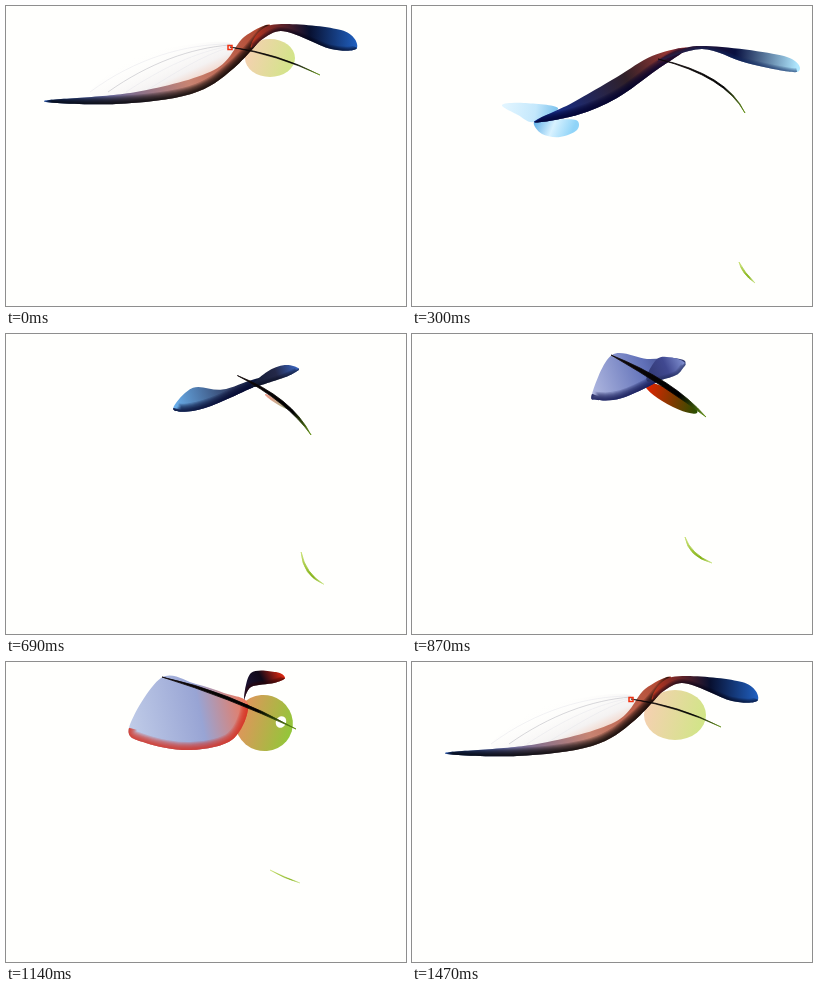
Animation, 400 px wide and 300 px high, one loop 1.5 s. Source, as an HTML page with a canvas:

```html
<!DOCTYPE html>
<html>
<head>
<meta charset="utf-8">
<style>
  html, body { margin: 0; overflow: hidden; background: #fffffd; }
  canvas { display: block; }
</style>
</head>
<body>
<canvas id="stage" width="400" height="300"></canvas>
<script>
const ctx = document.getElementById('stage').getContext('2d');
const LOOP = 1500, STEP = 30;
const TIMES = [0, 300, 540, 870, 1140, 1350, 1470];

// One row per key time; a missing last row repeats the first.
const leftWing = [
  [38,95, 110,98, 185,88, 228,62, 264,20, 238,31, 208,64, 130,86],
  [122,116, 165,109, 205,92, 243,65, 275,42, 240,50, 205,71, 160,97],
  [147,90, 172,91, 200,82, 230,69, 262,53, 232,62, 197,79, 170,82],
  [180,60, 186,66, 210,64, 245,48, 273,30, 262,24, 235,25, 200,21],
  [123,66, 140,81, 185,88, 227,77, 242,42, 218,31, 190,22, 155,16],
  [42,68, 105,87, 175,91, 222,73, 250,22, 222,26, 190,34, 120,61]
];
const rightWing = [
  [245,42, 275,25, 325,43, 351,42, 335,24, 265,19],
  [245,56, 290,43, 335,57, 385,66, 372,50, 285,40],
  [252,57, 280,46, 303,45, 319,41, 303,37, 275,46],
  [235,47, 262,42, 271,34, 273,29, 262,24, 245,25],
  [238,38, 245,25, 268,21, 279,16, 270,10, 245,11],
  [222,22, 262,17, 290,24, 306,23, 295,11, 255,14]
];
// Start, control point, end, thickness
const tail = [
  [224,41, 272,47, 314,69, 2], [246,53, 315,68, 333,107, 3],
  [252,57, 302,74, 316,113, 3], [199,21, 262,46, 294,83, 10],
  [156,15, 222,29, 290,67, 6], [226,36, 245,42, 252,46, 2]
];
const reflection = [
  [330,258, 334,268, 342,275, 0], [327,256, 332,266, 343,277, 3],
  [314,234, 318,256, 333,268, 3], [273,203, 279,220, 300,229, 4],
  [264,208, 278,215, 294,221, 1.5], [262,210, 276,215, 290,219, 0]
];
// Centre, radii, rotation
const belly = [
  [264,52, 25,19, 0], [285,70, 0,0, .5], [280,70, 0,0, .6],
  [259,64, 30,7, .5], [258,61, 29,28, .3], [262,61, 40,30, .1], [263,53, 31,25, 0]
];
const bellyHole = [
  [276,58, 0,0, .5], [276,58, 0,0, .5], [276,58, 0,0, .5],
  [275,60, 0,0, .5], [275,60, 5,6, .5], [280,57, 22,17, .5]
];
const wingHole = [
  [211,42, 0,0, -.5], [211,42, 0,0, -.5], [211,42, 0,0, -.5],
  [215,38, 0,0, -.5], [215,38, 0,0, -.5], [211,42, 22,10, -.45]
];
const drift = [[0,0], [0,0], [0,0], [0,0], [0,0], [0,0], [-5,-4]];
const fades = { // [membrane, light tips, belly]
  rows: [[1,0,.8], [0,1,0], [0,0,0], [0,0,1], [0,0,1], [0,0,1], [1,0,.8]]
};

const rgbRows = rows => rows.map(row => row.split(' ').flatMap(hex =>
  [0, 2, 4].map(i => parseInt(hex.slice(i, i + 2), 16))));
// Tip, middle, root, lower edge
const leftColors = rgbRows([
  '1a50b8 c88472 b04028 000000', '1030a0 302028 c04038 000030',
  '30a0f0 101018 101010 000010', 'b0b8e0 6070b8 303870 101850',
  'c0cce8 98a4d4 f07858 d03020', '3070c0 4a68b8 d04020 081040'
]);
// Root, middle, tip, lower edge
const rightColors = rgbRows([
  'c03820 081030 2060c0 000018', '501018 081040 b0e8ff 102860',
  '000000 080808 2050b0 000000', '303870 404890 8090d0 202858',
  '201840 100818 e02810 300000', 'e05030 300810 1a3a90 000010'
]);
const bellyColors = rgbRows([
  'f4c4a0 c4e068', 'f4a080 a0c040', 'f04020 508010',
  'f02000 205000', 'e89060 90c838', 'f07040 a0d030'
]);

// Smooth periodic interpolation of a keyed row at time t.
function at(rows, t) {
  const n = TIMES.length;
  const time = k => TIMES[(k + n) % n] + LOOP * Math.floor(k / n);
  const row = k => rows[(k + n) % n] || rows[0];
  let i = n - 1;
  while (TIMES[i] > t) i--;
  const span = time(i + 1) - time(i), s = (t - time(i)) / span;
  return row(i).map((a, j) => {
    const b = row(i + 1)[j];
    const slope = k => (row(k + 1)[j] - row(k - 1)[j]) / (time(k + 1) - time(k - 1)) * span;
    const r = 1 - s;
    return a * (1 + 2 * s) * r * r + slope(i) * s * r * r
         + b * s * s * (3 - 2 * s) - slope(i + 1) * s * s * r;
  });
}

const clamp = v => Math.max(0, Math.min(1, v));

function colorsAt(rows, t) {
  const v = at(rows, t), out = [];
  for (let i = 0; i < v.length; i += 3) {
    out.push(`rgb(${v.slice(i, i + 3).map(c => Math.round(255 * clamp(c / 255)))})`);
  }
  return out;
}

function gradient(x0, y0, x1, y1, colors, middle = .6) {
  const g = ctx.createLinearGradient(x0, y0, x1, y1);
  colors.forEach((c, i) => g.addColorStop(
    i === 0 ? 0 : i === colors.length - 1 ? 1 : middle, c));
  return g;
}

// Closed curve through the points, or only its first few segments.
function spline(v, segments = v.length / 2) {
  const path = new Path2D(), n = v.length / 2;
  const point = i => { const k = (i + n) % n; return [v[2 * k], v[2 * k + 1]]; };
  path.moveTo(...point(0));
  for (let i = 0; i < segments; i++) {
    const [a, b, c, d] = [-1, 0, 1, 2].map(k => point(i + k));
    path.bezierCurveTo(
      b[0] + (c[0] - a[0]) / 6, b[1] + (c[1] - a[1]) / 6,
      c[0] - (d[0] - b[0]) / 6, c[1] - (d[1] - b[1]) / 6, c[0], c[1]);
  }
  return path;
}

function drawWing(rows, colorRows, far, middle, edgeWidth, t) {
  const v = at(rows, t), colors = colorsAt(colorRows, t), edge = colors.pop();
  const outline = spline(v);
  ctx.save();
  ctx.fillStyle = gradient(v[0], v[1], v[2 * far], v[2 * far + 1], colors, middle);
  ctx.fill(outline);
  ctx.clip(outline);
  ctx.strokeStyle = edge;
  ctx.globalAlpha = .2;
  const lower = spline(v, far);
  for (let w = 2; w <= edgeWidth; w += 2) {
    ctx.lineWidth = w;
    ctx.stroke(lower);
  }
  ctx.restore();
}

function drawBlade(rows, colors, t) {
  const [x0, y0, cx, cy, x1, y1, width] = at(rows, t);
  if (width < .1) return;
  const d = Math.hypot(x1 - x0, y1 - y0);
  const nx = (y0 - y1) / d * width, ny = (x1 - x0) / d * width;
  ctx.beginPath();
  ctx.moveTo(x0, y0);
  ctx.quadraticCurveTo(cx, cy, x1, y1);
  ctx.quadraticCurveTo(cx + nx, cy + ny, x0, y0);
  ctx.fillStyle = ctx.strokeStyle = gradient(x0, y0, x1, y1, colors, .7);
  ctx.lineWidth = Math.min(.8, width / 3);
  ctx.fill();
  ctx.stroke();
}

function drawEllipse([x, y, rx, ry, angle], fill) {
  if (rx < .3 || ry < .3) return;
  ctx.beginPath();
  ctx.ellipse(x, y, rx, ry, angle, 0, 7);
  ctx.fillStyle = fill;
  ctx.fill();
}

function drawMembrane(alpha) {
  ctx.globalAlpha = alpha;
  const veil = spline([84,88, 128,52, 180,39, 224,37, 224,56, 190,78, 140,88]);
  ctx.fillStyle = gradient(150, 40, 175, 95, ['#fffffd00', '#f4f2f2', '#f0b8a0'], .6);
  ctx.fill(veil);
  ctx.lineWidth = .5;
  for (let i = 0; i < 4; i++) {
    ctx.strokeStyle = i === 1 ? '#b0b0b8' : '#e4e4ea';
    ctx.beginPath();
    ctx.moveTo(224, 38 + i);
    ctx.bezierCurveTo(180 + i * 5, 38 + i * 4, 130 + i * 13, 52 + i * 5, 84 + i * 18, 86);
    ctx.stroke();
  }
  ctx.globalAlpha = 1;
}

function drawLightTips(alpha) {
  ctx.globalAlpha = alpha;
  ctx.fillStyle = gradient(90, 98, 146, 108, ['#e4f6ff', '#c4e8fc', '#78c0ec']);
  ctx.fill(spline([90,99, 112,97, 146,102, 122,116, 106,109]));
  ctx.fillStyle = gradient(122, 116, 158, 131, ['#60b0e8', '#d8f2ff', '#90d4f8'], .5);
  ctx.fill(spline([122,116, 130,128, 148,131, 165,124, 164,114, 140,114]));
  ctx.globalAlpha = 1;
}

function draw(t) {
  const [membrane, tips, bellyAlpha] = at(fades.rows, t).map(clamp);
  ctx.fillStyle = '#fffffd';
  ctx.fillRect(0, 0, 400, 300);
  ctx.save();
  ctx.translate(...at(drift, t));
  drawMembrane(membrane);
  ctx.restore();

  const body = at(belly, t);
  ctx.globalAlpha = bellyAlpha;
  drawEllipse(body, gradient(body[0] - body[2], body[1] - 8, body[0] + body[2], body[1] + 8,
    colorsAt(bellyColors, t)));
  ctx.globalAlpha = 1;
  drawEllipse(at(bellyHole, t), '#fffffd');

  ctx.save();
  ctx.translate(...at(drift, t));
  drawLightTips(tips);
  drawWing(leftWing, leftColors, 4, .6, 16, t);
  drawEllipse(at(wingHole, t), '#fffffd');
  drawWing(rightWing, rightColors, 3, .55, 8, t);
  drawBlade(tail, ['#100808', '#000000', '#609010'], t);
  if (membrane > .5) {
    ctx.strokeStyle = '#f03010';
    ctx.lineWidth = 1.5;
    ctx.strokeRect(222, 39.5, 4, 4);
  }
  ctx.restore();
  drawBlade(reflection, ['#c8e070', '#80b010', '#d0e890'], t);
}

function tick(now) {
  draw(Math.floor(now % LOOP / STEP) * STEP);
  requestAnimationFrame(tick);
}
tick(performance.now());
</script>
</body>
</html>
```
